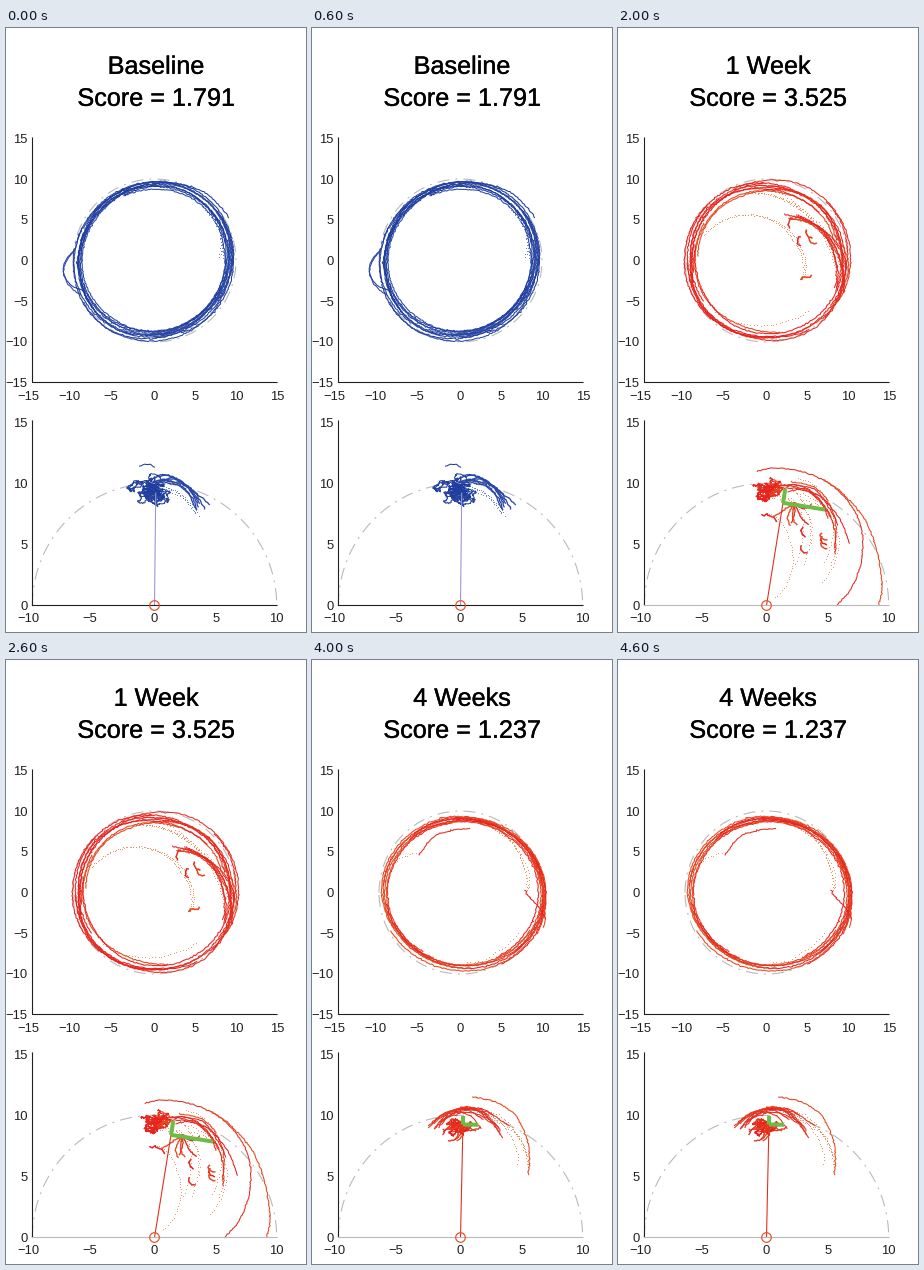
Write a matplotlib script that moves like this. It is 300 by 604 pixels and loops after 5000 ms.

```python
import numpy as np
import matplotlib.pyplot as plt
import matplotlib.patheffects as fx
from matplotlib.animation import ArtistAnimation
from matplotlib.patches import Circle

W, H, DPI = 300, 604, 100
PX = 72 / DPI
TOP = (148.5, 232.5, 8.15)       # origin x, origin y, pixels per unit
LOW = (148.5, 577.5, 12.22)
LEFT, RIGHT = 26.5, 271
INK, GREY, GREEN, RIM = "#231f20", "#b9b9b9", "#6cbd45", "#e8502a"
BLUE, RED = ["#1f3d9c", "#2a47a5"], ["#e8201f", "#e32f1f", "#e5481f"]
PALE_BLUE, PALE_RED = "#4a62b5", "#ee7a45"

plt.rcParams["font.family"] = "Liberation Sans"
fig = plt.figure(figsize=(W / DPI, H / DPI), dpi=DPI, facecolor="white")
ax = fig.add_axes([0, 0, 1, 1])
ax.set_xlim(0, W)
ax.set_ylim(H, 0)
ax.axis("off")


def line(xy, color, lw=1.0, z=2, **kw):
    x, y = np.asarray(xy, float).T
    return ax.plot(x, y, color=color, lw=lw * PX, zorder=z, snap=False, **kw)[0]


def place(plot, x, y):
    ox, oy, unit = plot
    return np.stack([ox + unit * x, oy - unit * y], -1)


def polar(plot, deg, r):
    th = np.radians(deg)
    return place(plot, r * np.cos(th), r * np.sin(th))


def hoop(xy, r):
    return ax.add_patch(Circle(xy, r, fill=False, ec=RIM, lw=1.2 * PX, zorder=7))


class Pen:
    """Draws one scene and collects its artists."""

    def __init__(self, seed, title, score, inks=RED, pale=PALE_RED):
        self.rng = np.random.RandomState(seed)
        self.inks, self.pale = inks, pale
        self.art = [ax.text(150.3, y, s, fontsize=25.2 * PX, ha="center",
                            va="baseline", color="black", zorder=5,
                            path_effects=[fx.withStroke(linewidth=0.35 * PX,
                                                        foreground="black")])
                    for y, s in ((45.8, title), (77.8, f"Score = {score}"))]

    def trace(self, xy, dots=False, lw=1.05):
        xy = xy[xy[:, 1] <= LOW[1]] + 0
        xy += self.rng.normal(0, 0.35, xy.shape)
        if dots:
            self.art.append(line(xy, self.pale, ls="", marker="o", ms=PX, mew=0))
        else:
            self.art.append(line(xy, self.rng.choice(self.inks), lw, 3))

    def wobble(self, t, size):
        """Smooth random offsets along t in 0..1."""
        return sum(size / k * np.sin(2 * np.pi * k * t + self.rng.uniform(0, 6.3))
                   for k in (1, 2, 4))

    def sweep(self, plot, n, start, end, sway=(0, 0), bulge=0, dots=False, lw=1.05):
        """n paths from one (angle, radius) to another, each swayed at random."""
        for _ in range(n):
            a0, r0 = start + self.rng.uniform(-0.5, 0.5, 2) * sway
            a1, r1 = end + self.rng.uniform(-1, 1, 2) * sway
            size = plot[2] * (np.radians(abs(a1 - a0)) * (r0 + r1) / 2 + abs(r1 - r0))
            t = np.linspace(0, 1, max(4, int(size / (3.4 if dots else 1.6))))
            r = r0 + (r1 - r0) * t**1.4 + bulge * np.sin(np.pi * t)
            r += self.wobble(t, 0.08)
            self.trace(polar(plot, a0 + (a1 - a0) * t, r), dots, lw)

    def ring(self, n, centre, radii, tilt=0, spread=0.4, span=(90, 300), power=2.0):
        """n broken laps around a tilted superellipse."""
        (cx, cy), (rx, ry) = centre, radii
        for off in np.linspace(-1, 1, n) * spread:
            first, length = self.rng.uniform(0, 360), self.rng.uniform(*span)
            t = np.arange(0, length, 1.2) / 360
            deg = first + t * 360
            c, s = (f(np.radians(deg - tilt)) for f in (np.cos, np.sin))
            r = (abs(c / rx)**power + abs(s / ry)**power)**(-1 / power)
            r += off + self.wobble(t, spread * 0.55)
            x, y, unit = TOP
            self.trace(polar((x + cx * unit, y - cy * unit, unit), deg, r))

    def knot(self, centre, size, n):
        """Tangle of slow random loops."""
        t = np.linspace(0, 1, 70)
        for _ in range(n):
            x, y = (m + s * (self.rng.normal(0, 0.7) + self.wobble(t, 0.55))
                    for m, s in zip(centre, size))
            self.trace(place(LOW, x, y))

    def burst(self, n, centre, sector, reach):
        """Short bent rays leaving one point."""
        t = np.linspace(0, 1, 20)
        for deg in np.linspace(*sector, n):
            bend = self.rng.normal(0, 25) * t**2
            r = self.rng.uniform(*reach) * t
            x, y = place(LOW, *centre)
            self.trace(polar((x, y, LOW[2]), deg + bend, r), lw=1.3)

    def curls(self, plot, n, sector, reach):
        """Short hooked ends scattered over a sector."""
        t = np.linspace(0, 1, 9)
        for _ in range(n):
            x, y = polar(plot, self.rng.uniform(*sector), self.rng.uniform(*reach))
            turn = self.rng.uniform(180, 270)
            self.trace(polar((x, y, 9), turn + 70 * t, t), lw=1.5)

    def pole(self, tip, color=RED[1], arms=()):
        """Line from the pivot with bars along and across it."""
        tip = np.array(tip)
        up = tip / np.hypot(*tip)
        end = place(LOW, *tip)
        self.art.append(line([LOW[:2], end], color, 1.1, 4))
        for size, way in zip(arms, (up, up[::-1] * (1, -1))):
            self.art.append(line([end, place(LOW, *(tip + size * way))], GREEN, 4, 6,
                                 solid_capstyle="butt"))

    def base(self, color=GREY, lw=1.1):
        self.art.append(line([(LEFT, LOW[1]), (RIGHT, LOW[1])], color, lw, 4))


def baseline():
    p = Pen(3, "Baseline", "1.791", BLUE, PALE_BLUE)
    p.ring(15, (0, 0), (9.55, 9.05), 45, 0.42, (150, 330))
    p.sweep(TOP, 2, (172, 9.9), (204, 9.8), (3, 0.3), 1.3)
    p.sweep(TOP, 1, (92, 9.5), (30, 10.6), bulge=0.2)
    p.sweep(TOP, 3, (58, 9.2), (0, 8.4), (6, 0.4), dots=True)
    p.sweep(TOP, 1, (212, 9.6), (270, 8.7), dots=True)
    p.knot((-0.1, 9.4), (0.75, 0.55), 24)
    p.sweep(LOW, 7, (89, 10.3), (65, 9.1), (5, 0.6), 0.4, lw=1.3)
    p.sweep(LOW, 3, (85, 9.6), (64, 8.5), (3, 0.5), dots=True)
    p.sweep(LOW, 1, (96, 11.6), (90, 11.4))
    p.pole((0.1, 9.2), "#9a98d2")
    p.base(INK)
    return p.art


def day_one():
    p = Pen(12, "1 Day", "4.019")
    p.ring(19, (-0.1, -1.7), (9.3, 7.9), -4, 1.0, (50, 210), 2.5)
    p.sweep(TOP, 1, (128, 10), (225, 9.9), bulge=0.3)
    p.sweep(TOP, 1, (243, 8.7), (313, 5.2))
    p.sweep(TOP, 2, (150, 2.5), (88, 4.6), (8, 0.5))
    p.sweep(TOP, 5, (70, 6.2), (-25, 8.8), (20, 1.2))
    p.sweep(TOP, 8, (145, 8), (0, 6.5), (28, 2.2), -1.5, dots=True)
    p.curls(TOP, 9, (-60, 190), (2, 7))

    p.sweep(LOW, 17, (97, 10.4), (20, 8), (22, 2), 0.9)
    p.sweep(LOW, 2, (100, 11), (0, 10), (6, 0.5), 0.7)
    p.sweep(LOW, 8, (85, 10), (15, 6), (20, 2), 0.8, dots=True)
    p.sweep(LOW, 5, (100, 9), (145, 4.5), (18, 1.5), dots=True)
    p.sweep(LOW, 1, (132, 9.9), (72, 11.4), bulge=0.5)
    p.sweep(LOW, 1, (67, 13.3), (39, 11.7))
    p.sweep(LOW, 1, (129, 6.6), (180, 4.5), bulge=-0.2)
    p.sweep(LOW, 1, (80, 10.5), (67, 13.3), dots=True)
    p.knot((-0.4, 9.5), (0.9, 0.7), 5)
    p.burst(9, (-0.5, 9.6), (130, 330), (1, 2.4))
    p.burst(8, (2.2, 9), (200, 340), (1, 2.6))
    p.curls(LOW, 10, (20, 75), (5, 8.5))
    p.curls(LOW, 2, (125, 135), (2, 2.8))
    p.pole((2.13, 7.4), arms=(1.8, 3.93))
    p.art.append(hoop(place(LOW, 2.13, 7.4), 4))
    p.base("#6d6e71", 2.2)
    p.art.append(line([(LEFT, 393), (LEFT, LOW[1])], "#6d6e71", 1.6, 4))
    return p.art


def week_one():
    p = Pen(21, "1 Week", "3.525")
    p.ring(13, (0.05, 0), (9.35, 9.2), 0, 0.6, (120, 300), 2.1)
    p.sweep(TOP, 6, (62, 6.3), (-18, 9.6), (15, 1), 0.4)
    p.sweep(TOP, 2, (20, 8.6), (-32, 9.5), (8, 0.8), 0.8)
    p.sweep(TOP, 4, (100, 8.6), (0, 8.4), (20, 0.6), -1, dots=True)
    p.sweep(TOP, 2, (156, 8.2), (-22, 4.9), (6, 0.2), -2.3, dots=True)
    p.sweep(TOP, 1, (225, 8.8), (310, 8), bulge=-0.5, dots=True)
    p.sweep(TOP, 1, (-29, 4.8), (-19, 5.8), lw=1.6)
    p.curls(TOP, 4, (25, 70), (4.5, 7))

    p.knot((0.1, 9.4), (0.7, 0.5), 16)
    p.sweep(LOW, 1, (94, 11), (0, 5.7), bulge=1.5)
    p.sweep(LOW, 1, (65, 11.2), (0, 9.1))
    p.sweep(LOW, 6, (85, 9.9), (48, 7.6), (13, 1.5), 0.6)
    p.sweep(LOW, 6, (82, 9.6), (38, 5.2), (20, 2), 0.8, dots=True)
    p.sweep(LOW, 1, (90, 7.5), (40, 1), dots=True)
    p.sweep(LOW, 1, (93, 7.5), (83, 7), lw=1.5)
    p.burst(7, (2.3, 8.4), (215, 330), (1, 2.4))
    p.curls(LOW, 5, (45, 68), (5, 7.5))
    p.pole((1.35, 8.4), arms=(1.16, 3.49))
    p.base()
    return p.art


def week_two():
    p = Pen(35, "2 Weeks", "2.443")
    p.ring(15, (0.15, 0), (9.75, 9.2), 20, 0.45, (120, 300))
    p.sweep(TOP, 3, (70, 6.4), (0, 9.9), (8, 0.4), 0.5)
    p.sweep(TOP, 1, (27, 5.1), (0, 10), lw=1.4)
    p.sweep(TOP, 1, (20, 8.6), (-16, 8.8), bulge=-0.4, lw=1.4)
    p.sweep(TOP, 4, (132, 8.4), (0, 8.4), (12, 0.5), -1.8, dots=True)
    p.sweep(TOP, 1, (215, 9), (310, 8), dots=True)
    p.curls(TOP, 3, (20, 45), (4.5, 6))

    p.knot((-0.1, 9.6), (0.75, 0.5), 12)
    p.burst(24, (0.1, 9.7), (165, 335), (1.3, 3.2))
    p.sweep(LOW, 3, (92, 10.3), (34, 9.2), (6, 0.5), 0.9)
    p.sweep(LOW, 3, (88, 9.9), (45, 7.3), (10, 0.8), 0.6)
    p.sweep(LOW, 1, (86, 9.5), (0, 5.2), bulge=0.9)
    p.sweep(LOW, 6, (84, 9.6), (40, 7.4), (12, 1.6), 0.3, dots=True)
    p.sweep(LOW, 1, (89, 7.2), (3, 5), bulge=-1.8, dots=True)
    p.pole((0.33, 9.04), arms=(1, 2.4))
    p.base()
    return p.art


def week_four():
    p = Pen(44, "4 Weeks", "1.237")
    p.ring(14, (0.4, -0.15), (9.75, 9.05), -5, 0.38, (120, 300))
    p.sweep(TOP, 1, (137, 6.9), (82, 7.9), bulge=0.3)
    p.sweep(TOP, 1, (157, 9), (137, 6.9), dots=True)
    p.sweep(TOP, 3, (28, 9.9), (-25, 10.9), (8, 0.5))
    p.sweep(TOP, 1, (2, 8), (-17, 11))
    p.sweep(TOP, 3, (65, 8.8), (2, 8), (6, 0.5), dots=True)
    p.sweep(TOP, 1, (275, 8.6), (325, 8.6), dots=True)

    p.knot((-0.2, 9.1), (0.5, 0.3), 15)
    p.sweep(LOW, 9, (102, 9.5), (74, 9.6), (9, 0.7), 1)
    p.burst(9, (0, 9.3), (185, 335), (1, 2))
    p.sweep(LOW, 1, (85, 11.6), (43, 7.6), bulge=0.6)
    p.sweep(LOW, 4, (82, 10.4), (47, 8), (6, 0.6), 0.3, dots=True)
    p.pole((0.2, 9.25), arms=(0.7, 1.25))
    p.base()
    return p.art


def label(x, y, v, ha="center"):
    text = f"\u2212{-v}" if v < 0 else str(v)
    ax.text(x, y, text, fontsize=13 * PX, ha=ha, va="center_baseline",
            color=INK, zorder=5)


def guides(plot, low, wide, turn):
    """Axis numbers and the dash-dot circle of one plot."""
    x, y, unit = plot
    for v in range(-wide, wide + 1, 5):
        label(x + v * unit - 3.5 * (v < 0), y - low * unit + 12.3, v)
    for v in range(low, 16, 5):
        label(21.8, y - v * unit, v, "right")
    line(polar(plot, np.linspace(180, 180 - turn, 240), 10), GREY, 1.1, 1,
         dashes=[11, 5.5, 1.8, 5.5], dash_capstyle="butt")


guides(TOP, -15, 15, 360)
guides(LOW, 0, 10, 180)
line([(LEFT, 110), (LEFT, 354.5), (RIGHT, 354.5)], INK, 1.1, 5)
line([(LEFT, 393), (LEFT, LOW[1])], INK, 1.1, 3)
hoop(LOW[:2], 4.8)

scenes = [draw() for draw in (baseline, day_one, week_one, week_two, week_four)]
anim = ArtistAnimation(fig, scenes, interval=1000, repeat=True, repeat_delay=0)
plt.show()
```
